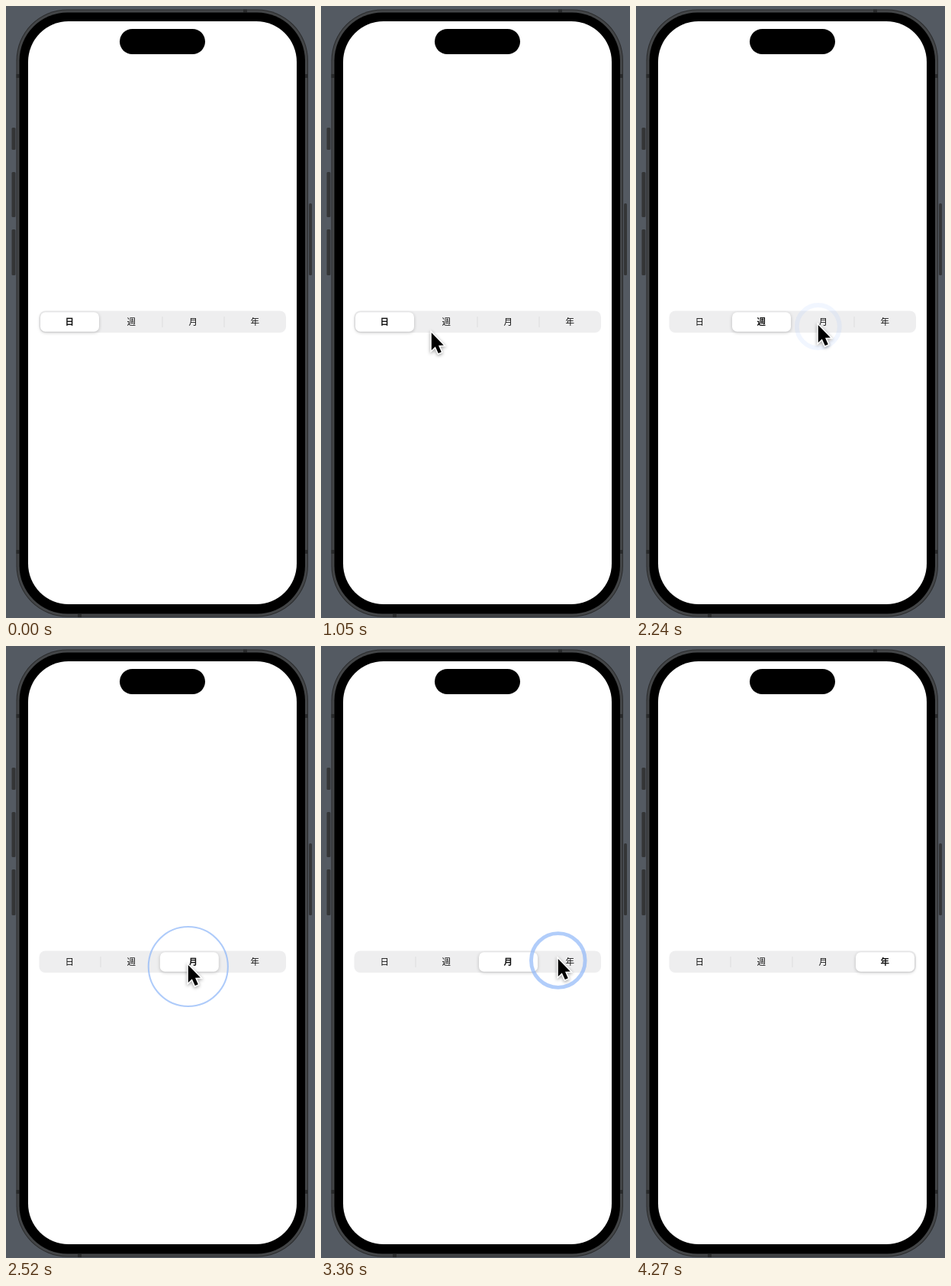
Animation of 405x800 px, one loop 4760 ms. Source, as an HTML page with a canvas:

```html
<!DOCTYPE html>
<html lang="ja">
<head>
<meta charset="utf-8">
<title>Segmented control</title>
<style>
html, body { margin: 0; width: 100%; height: 100%; overflow: hidden; background: #545a62; }
canvas { display: block; width: 405px; height: 800px; }
</style>
</head>
<body>
<canvas id="stage" width="405" height="800"></canvas>
<script>
const ctx = document.getElementById('stage').getContext('2d');
const LOOP = 4760, STEP = 70;
const LABELS = ['日', '週', '月', '年'];
const SEGMENT = 81;
const CLICKS = [1330, 2240, 3290];

// Pointer stops: time, x, y
const PATH = [
  [490, 160, 812], [980, 144, 427], [1050, 144, 426], [1190, 144, 421],
  [1820, 144, 421], [2240, 238, 416], [2590, 238, 416], [3010, 310, 408],
  [3710, 310, 408], [4060, 330, 812]
];
const ARROW = [[0, 0], [0, 23], [5, 18.2], [9, 27], [13, 25.2], [9.2, 16.7], [16, 16.5]];

const clamp = u => Math.min(1, Math.max(0, u));
const easeOut = u => 1 - (1 - clamp(u)) ** 3;
const smooth = u => u * u * (3 - 2 * u);
const mix = (a, b, u) => a + (b - a) * u;

function box(x, y, w, h, r, color) {
  ctx.fillStyle = color;
  ctx.beginPath();
  ctx.roundRect(x, y, w, h, r);
  ctx.fill();
}

function withShadow(color, blur, offset, draw) {
  ctx.save();
  ctx.shadowColor = color;
  ctx.shadowBlur = blur;
  ctx.shadowOffsetY = offset;
  draw();
  ctx.restore();
}

function drawPhone() {
  box(0, 0, 405, 800, 0, '#545a62');
  for (const [y, h] of [[159, 29], [217, 59], [292, 60]]) box(7.5, y, 5, h, 1.5, '#343536');
  box(397, 258, 4, 94, 1.5, '#343536');
  box(13.5, 4.5, 382.5, 794, 67, '#2a2b2c');
  box(14.5, 5.5, 380.5, 792, 66, '#434547');
  for (const y of [89, 711]) {
    box(13.5, y, 4, 5, 0, '#292a2b');
    box(392, y, 4, 5, 0, '#292a2b');
  }
  box(311, 4.5, 5, 4, 0, '#292a2b');
  box(94, 795, 5, 4, 0, '#292a2b');
  box(17.5, 8.5, 374.5, 786, 63, '#000');
  box(29, 20, 352, 762, 53, '#fff');
  box(149, 30, 112, 33, 16.5, '#000');
}

function drawControl(t) {
  const selected = CLICKS.filter(c => t >= c + 100).length;
  const slide = CLICKS.reduce((sum, c) => sum + easeOut((t - c - 100) / 300), 0);

  box(43.5, 398.5, 323.5, 28.5, 8, '#eeeeef');
  for (let i = 1; i < LABELS.length; i++) {
    if (i !== selected && i !== selected + 1) box(42.5 + i * SEGMENT, 406, 1, 14, 0, '#dcdcde');
  }
  withShadow('rgba(0,0,0,.22)', 4, 1.2, () =>
    box(45 + slide * SEGMENT, 400.3, 77, 25.4, 6.5, '#fff'));

  ctx.fillStyle = '#111';
  ctx.textAlign = 'center';
  ctx.textBaseline = 'alphabetic';
  LABELS.forEach((label, i) => {
    ctx.font = `${i === selected ? 600 : 400} 11.5px "Noto Sans CJK JP", "Noto Sans CJK", sans-serif`;
    ctx.fillText(label, 83.3 + i * SEGMENT, 417.3);
  });
}

function pointerAt(t) {
  const next = PATH.findIndex(stop => stop[0] > t);
  if (next < 1) return null;
  const [t0, x0, y0] = PATH[next - 1], [t1, x1, y1] = PATH[next];
  const raw = (t - t0) / (t1 - t0);
  const u = next === 1 ? easeOut(raw) : smooth(raw);
  return [mix(x0, x1, u), mix(y0, y1, u)];
}

function drawRing(t, [x, y]) {
  const age = t - CLICKS.findLast(c => t >= c);
  if (!(age < 420)) return;
  const fadeIn = clamp(0.12 + age / 125);
  const fadeOut = clamp((420 - age) / 200);
  ctx.globalAlpha = fadeIn * fadeOut;
  ctx.strokeStyle = '#8cb6f8';
  ctx.lineWidth = 5.8 - age / 75;
  ctx.beginPath();
  ctx.arc(x + 0.8, y + 3, 28 + 27 * Math.sin(age / 420 * Math.PI / 2 * 1.05), 0, Math.PI * 2);
  ctx.stroke();
  ctx.globalAlpha = 1;
}

function drawPointer([x, y]) {
  ctx.save();
  ctx.translate(x + 0.8, y + 1);
  ctx.beginPath();
  for (const [px, py] of ARROW) ctx.lineTo(px, py);
  ctx.closePath();
  ctx.lineJoin = 'miter';
  ctx.lineWidth = 3;
  ctx.strokeStyle = '#fff';
  withShadow('rgba(0,0,0,.4)', 4, 1.5, () => ctx.stroke());
  ctx.fillStyle = '#000';
  ctx.fill();
  ctx.restore();
}

function render(now) {
  const t = Math.floor(now % LOOP / STEP) * STEP;
  drawPhone();
  drawControl(t);
  const pointer = pointerAt(t);
  if (pointer) {
    drawRing(t, pointer);
    drawPointer(pointer);
  }
}

const start = performance.now();
function tick() {
  render(performance.now() - start);
  requestAnimationFrame(tick);
}
tick();
</script>
</body>
</html>
```
